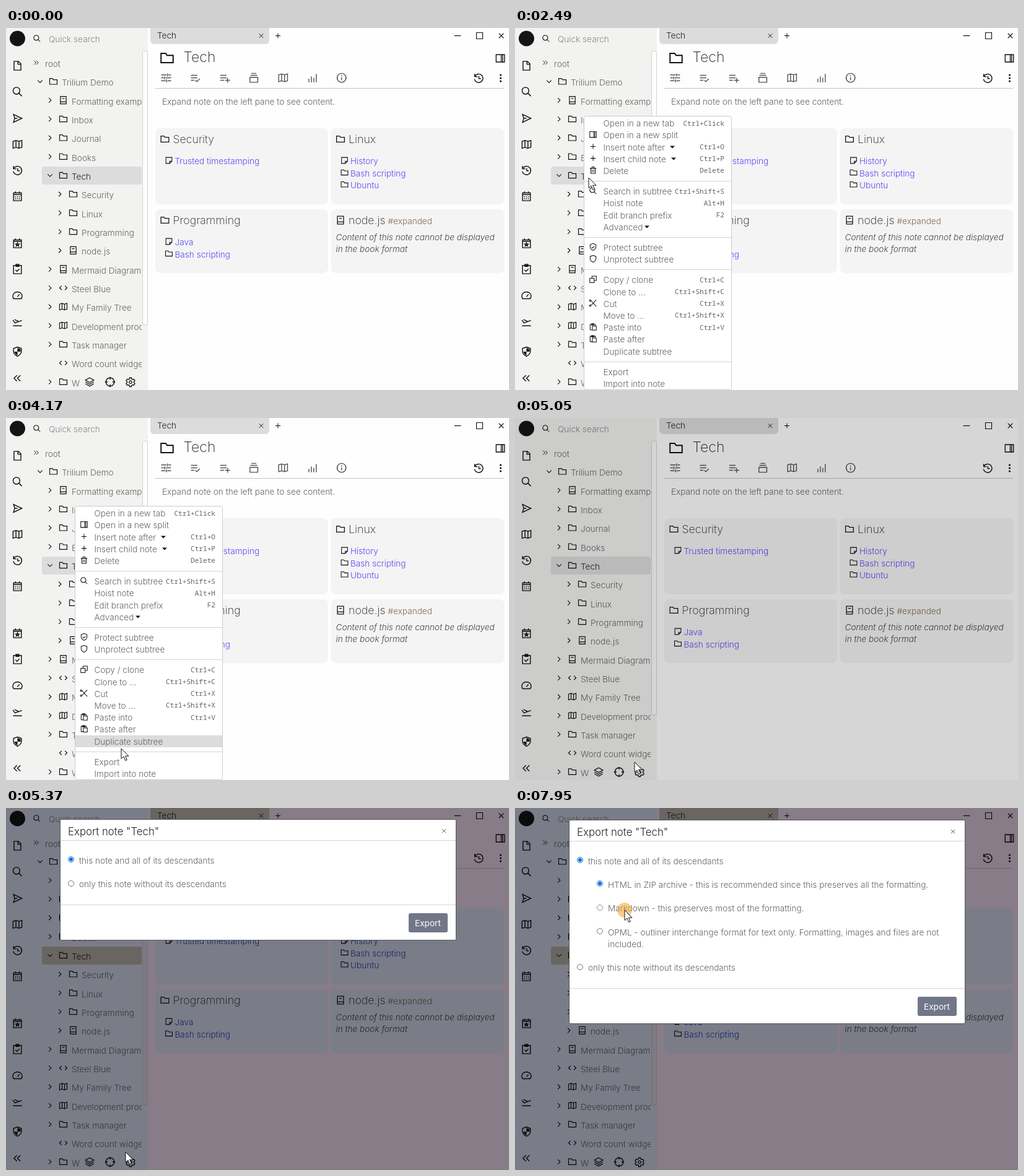
An HTML page that plays this animation: 812 px wide and 585 px high, repeating every 8000 ms.

```html
<!DOCTYPE html>
<html lang="en">
<head>
<meta charset="utf-8">
<title>Exporting a note</title>
<style>
  html, body { margin: 0; width: 100%; height: 100%; overflow: hidden; }
  svg {
    display: block; width: 812px; height: 585px;
    font: 300 13.6px Inter, sans-serif; fill: #646464;
    --main: #fefefe; --panel: #f2f2f1; --card: #f4f4f4; --picked: #dbdcdb;
    --bar: #fdfdfd; --link: #5a48fa;
  }
  svg.dim { --main: #ffeaff; --panel: #e6ecff; --card: #e6ecff; --picked: #c6bfb6; --bar: #eee4f4; --link: #2a40c4; }
  text { white-space: pre; }
  .icon { fill: none; stroke: #111; stroke-width: 1.8; }
  .tool .icon { stroke: #555; }
  .link { fill: var(--link); }
  .dark { fill: #222; }
  .title { fill: #222; font-size: 17.8px; font-weight: 200; }
  .mono { font: 11.1px "Noto Sans Mono", monospace; text-anchor: end; }
  .line { stroke: #d4d4d4; }
</style>
</head>
<body>
<svg id="stage" viewBox="0 0 812 585"></svg>
<script>
const stage = document.getElementById('stage');

// Outlines on a 24 unit grid.
const ICONS = {
  folder: 'M3 5h7l2 3h9v11H3z',
  book: 'M5 3h14v18H5zM5 16h14M9 8h6',
  note: 'M4 4h16v10l-6 6H4zM20 14h-6v6',
  file: 'M5 3h9l5 5v13H5zM13 3v6h6',
  search: 'M10 3a7 7 0 1 0 .01 0zM15 15l6 6',
  send: 'M4 4l17 8-17 8 2.5-8zM6 12h6',
  map: 'M3 6l6-2 6 2 6-2v14l-6 2-6-2-6 2zM9 4v14M15 6v14',
  history: 'M4.5 8a8.7 8.7 0 1 1-1 6M4 3v6h6M12.5 8v5h4',
  calendar: 'M4 5h16v16H4zM4 8.5h16M8 2v4M16 2v4M7 13h2m2 0h2m2 0h2M7 17h2m2 0h2m2 0h2',
  event: 'M4 5h16v16H4zM4 8h16M8 2v4M16 2v4M12 11l1 2.5h2.5l-2 1.5.8 2.5-2.3-1.5-2.3 1.5.8-2.5-2-1.5h2.5z',
  task: 'M4 4h16v17H4zM9 2v4h6v-4zM8 13l3 3 5-5',
  gauge: 'M4.5 19a9.5 8.7 0 1 1 15 0zM12 15l4-5',
  plane: 'M3 20h18M2.5 8l4.5 6 14-5M6 7l8 4',
  shield: 'M12 2.5l8 3v6c0 5-4 8-8 10-4-2-8-5-8-10v-6z',
  check: 'M8 12l3 3 5-5',
  left2: 'M11 6l-6 6 6 6M18 6l-6 6 6 6',
  right2: 'M6 6l6 6-6 6M13 6l6 6-6 6',
  right: 'M9 6l6 6-6 6',
  down: 'M6 9l6 6 6-6',
  code: 'M8 7l-5 5 5 5M16 7l5 5-5 5',
  layers: 'M12 3l9 5-9 5-9-5zM3 12l9 5 9-5M3 16l9 5 9-5',
  target: 'M12 3a9 9 0 1 0 .01 0zM12 1v6M12 17v6M1 12h6M17 12h6',
  cog: 'M10 3h4l.6 2.6 2.2 1.2 2.6-.8 2 3.5-2 1.9v2.2l2 1.9-2 3.5-2.6-.8-2.2 1.2L14 22h-4l-.6-2.6-2.2-1.2-2.6.8-2-3.5 2-1.9v-2.2l-2-1.9 2-3.5 2.6.8 2.2-1.2zM12 9.5a3 3 0 1 0 .01 0z',
  sliders: 'M2 6h11M17 6h5M15 3v6M2 12h5M11 12h11M9 9v6M2 18h9M15 18h7M13 15v6',
  listCheck: 'M3 7h13M3 12h13M3 17h7M12 17l3 3 6-6',
  listPlus: 'M3 7h13M3 12h13M3 17h8M18 12v10M13 17h10',
  stack: 'M4 11h16v10H4zM5 7h14M7 3h10',
  chart: 'M5 14v7M10 9v12M15 12v9M20 4v17',
  info: 'M12 3a9 9 0 1 0 .01 0zM12 11v6M12 7v2',
  split: 'M3 4h18v16H3zM14 4v16M17 4v16',
  plus: 'M12 5v14M5 12h14',
  close: 'M6 6l12 12M18 6L6 18',
  minus: 'M4 12h16',
  square: 'M4 4h16v16H4z',
  trash: 'M6 7h12v14H6zM3 7h18M9 7V3h6v4M10 11v6M14 11v6',
  copy: 'M3 9h12v12H3zM9 9V3h12v12h-6',
  cut: 'M5 4l12 13M5 20L17 7M4 3a2 2 0 1 0 .01 0zM4 17a2 2 0 1 0 .01 0zM17 17l4 4M17 7l4-4',
  paste: 'M9 20H4V5h14v4M8 3h6v4H8zM10 10h11v11H10z'
};

const text = (x, y, content, attrs = '') =>
  `<text x="${x}" y="${y + 5.2}" ${attrs}>${content}</text>`;
const icon = (name, x, y, size = 16, attrs = '') =>
  `<path class="icon" d="${ICONS[name]}" transform="translate(${x - size / 2} ${y - size / 2}) scale(${size / 24})" ${attrs}/>`;
const rect = (x, y, w, h, fill, r = 0, attrs = '') =>
  `<rect x="${x}" y="${y}" width="${w}" height="${h}" rx="${r}" style="fill:${fill}" ${attrs}/>`;
const line = (x1, x2, y) => `<path class="line" d="M${x1} ${y}H${x2}"/>`;

function launcher() {
  const items = [['file', 61], ['search', 103], ['send', 146], ['map', 188], ['history', 230], ['calendar', 272],
    ['event', 348], ['task', 390], ['gauge', 432], ['plane', 475], ['shield', 523], ['left2', 566]];
  return items.map(([name, y]) => icon(name, 18.5, y, 19)).join('') +
    '<path d="M18.5 517l5 2v4h-5zM18.5 523v6q-4-2-5-6z" fill="#111"/>';
}

function tree() {
  const rows = [
    [0, 'down', 'folder', 'Trilium Demo'], [1, 'right', 'book', 'Formatting examples'],
    [1, 'right', 'folder', 'Inbox'], [1, 'right', 'folder', 'Journal'], [1, 'right', 'folder', 'Books'],
    [1, 'down', 'folder', 'Tech'], [2, 'right', 'folder', 'Security'], [2, 'right', 'folder', 'Linux'],
    [2, 'right', 'folder', 'Programming'], [2, 'right', 'book', 'node.js'],
    [1, 'right', 'book', 'Mermaid Diagrams'], [1, 'right', 'code', 'Steel Blue'],
    [1, 'right', 'map', 'My Family Tree'], [1, 'right', 'map', 'Development process'],
    [1, 'right', 'folder', 'Task manager'], [1, '', 'code', 'Word count widget'],
    [1, 'right', 'folder', 'Workspaces']
  ];
  const body = rows.map(([level, arrow, kind, label], i) => {
    const x = 16 * level, y = 57.7 + 30.33 * (i + 1);
    return (arrow ? icon(arrow, 55 + x, y - 1.5, 15) : '') + icon(kind, 76.5 + x, y - 1.7, 16) +
      text(90 + x, y, label, label === 'Tech' ? 'class="dark"' : '');
  }).join('');
  return rect(58, 224, 161, 29, 'var(--picked)', 3) +
    `<clipPath id="treeClip"><path d="M40 0H219V560H119V585H40z"/></clipPath><g clip-path="url(#treeClip)">${body}</g>` +
    icon('right2', 48.5, 56, 13) + text(63, 57.5, 'root') +
    rect(220.5, 37.5, 8, 442, 'var(--bar)', 2, 'stroke="#d2d2d2"') +
    icon('layers', 135, 572, 18) + icon('target', 168, 572, 18) + icon('cog', 201, 572, 18);
}

function card(x, y, h, kind, title, links) {
  return rect(x, y, x < 300 ? 279 : 280, h, 'var(--card)', 8) +
    icon(kind, x + 15.5, y + 17.5, 17) + text(x + 28.5, y + 19, title, 'class="title"') +
    links.map(([type, label], i) => icon(type, x + 22, y + 52 + i * 19.4, 14.5) +
      text(x + 31.5, y + 53 + i * 19.4, label, 'class="link"')).join('');
}

function notePane() {
  const tools = ['sliders', 'listCheck', 'listPlus', 'stack', 'map', 'chart', 'info'];
  return rect(233, -8, 192, 34, 'var(--picked)', 6) + text(244, 12, 'Tech', 'class="dark"') +
    icon('close', 412, 12.5, 13) + icon('plus', 439, 12.5, 14) +
    icon('minus', 729, 12.5, 16) + icon('square', 764.5, 12.5, 15) + icon('close', 799.5, 12.5, 15) +
    icon('folder', 260, 48.5, 26) + text(286.5, 50, 'Tech', 'class="title" style="font-size:23px"') +
    icon('split', 798, 49, 18) +
    `<g class="tool">${tools.map((name, i) => icon(name, 258.5 + i * 47.2, 80.5, 19)).join('')}</g>` +
    icon('history', 763, 81, 19) +
    [76, 81, 86].map(y => `<circle cx="798.5" cy="${y}" r="1.6" fill="#111"/>`).join('') +
    '<path d="M241 97.5H804" stroke="#c4c4c4"/>' +
    text(252, 119, 'Expand note on the left pane to see content.') +
    card(241, 162, 123, 'folder', 'Security', [['note', 'Trusted timestamping']]) +
    card(524.5, 162, 123, 'folder', 'Linux', [['note', 'History'], ['folder', 'Bash scripting'], ['folder', 'Ubuntu']]) +
    card(241, 293, 103, 'folder', 'Programming', [['note', 'Java'], ['folder', 'Bash scripting']]) +
    card(524.5, 293, 103, 'book', 'node.js', []) +
    text(616.5, 312, '#expanded', 'fill="#7d6a58"') +
    ['Content of this note cannot be displayed', 'in the book format'].map((s, i) =>
      text(532.5, 338 + 19 * i, s, 'fill="#444" font-style="italic"')).join('');
}

const ROW = 19.2;
const menuRows = [];
function menu() {
  const groups = [
    [['', 'Open in a new tab', 'Ctrl+Click'], ['split', 'Open in a new split'],
      ['plus', 'Insert note after', 'Ctrl+O', 254], ['plus', 'Insert child note', 'Ctrl+P', 256], ['trash', 'Delete', 'Delete']],
    [['search', 'Search in subtree', 'Ctrl+Shift+S'], ['', 'Hoist note', 'Alt+H'],
      ['', 'Edit branch prefix', 'F2'], ['', 'Advanced', '', 213]],
    [['shield', 'Protect subtree'], ['shield', 'Unprotect subtree']],
    [['copy', 'Copy / clone', 'Ctrl+C'], ['', 'Clone to ...', 'Ctrl+Shift+C'], ['cut', 'Cut', 'Ctrl+X'],
      ['', 'Move to ...', 'Ctrl+Shift+X'], ['paste', 'Paste into', 'Ctrl+V'], ['paste', 'Paste after'], ['', 'Duplicate subtree']],
    [['', 'Export'], ['', 'Import into note']]
  ];
  let y = 154, body = '';
  groups.forEach((group, g) => {
    if (g) body += line(112, 349, Math.round(y - 17) + .5);
    for (const [kind, label, keys = '', caret] of group) {
      menuRows.push(y);
      if (kind) body += icon(kind, 126, y - 1, 14);
      if (label === 'Protect subtree') body += icon('check', 126, y - 1, 14);
      body += text(142.5, y, label) + text(338, y - 1.7, keys, 'class="mono"');
      if (caret) body += `<path d="M${caret - 4} ${y - 2}h8l-4 4z" fill="#111"/>`;
      y += ROW;
    }
    y += 14;
  });
  return `<g id="menu">${rect(111.5, 142.5, 238, 442, '#fff', 3, 'stroke="#ccc"')}
    <rect id="hover" x="112" width="237" height="${ROW}" fill="#dcdcdc"/>${body}</g>`;
}

const radio = (x, y, on) => on
  ? `<circle cx="${x}" cy="${y}" r="4.5" fill="#fff" stroke="#0b6fd6"/><circle cx="${x}" cy="${y}" r="3" fill="#0b6fd6"/>`
  : `<circle class="radio" cx="${x}" cy="${y}" r="4.5" fill="#fff" stroke="#767676"/>`;

function dialog() {
  return `<g id="dialog">${rect(87.5, 19.5, 639, 329, '#fff', 2, 'id="sheet" stroke="#555"')}
    ${text(100, 40, 'Export note "Tech"', 'class="dark" font-size="16.8"')}
    ${icon('close', 707, 38, 13, 'style="stroke:#666"')}${line(88, 726, 53.5)}
    ${radio(105, 84, true)}${text(118, 86, 'this note and all of its descendants')}
    <g id="formats">
      ${radio(137, 122, true)}${text(150, 124, 'HTML in ZIP archive - this is recommended since this preserves all the formatting.')}
      ${radio(137, 161)}${text(150, 162, 'Markdown - this preserves most of the formatting.')}
      ${radio(137, 199)}${text(150, 201, 'OPML - outliner interchange format for text only. Formatting, images and files are not')}
      ${text(150, 220, 'included.')}
    </g>
    <g id="lower">
      ${radio(105, 257)}${text(118, 258, 'only this note without its descendants')}
      ${line(88, 726, 291.5)}${rect(650, 305, 63, 31, '#727689', 3)}
      ${text(660, 320.5, 'Export', 'style="fill:#fff;font-weight:400"')}
    </g></g>`;
}

stage.innerHTML = rect(0, 0, 812, 585, 'var(--main)') + rect(0, 0, 229, 585, 'var(--panel)') +
  '<circle cx="18.5" cy="17" r="12.5" fill="#141414"/>' +
  icon('search', 50, 17, 14) + text(69, 18, 'Quick search', 'fill="#888"') +
  launcher() + tree() + notePane() +
  '<rect id="shade" width="812" height="585" fill="#000"/>' + menu() + dialog() +
  `<g id="cursor"><circle id="press" r="12" fill="#f2a52e" fill-opacity=".55"/>
   <path d="M0 0V16.5L4 13L6.7 19.5 9.3 18.4 6.6 12.2H12Z" fill="#fff" stroke="#111"/></g>`;

const part = Object.fromEntries(['shade', 'menu', 'hover', 'dialog', 'sheet', 'formats', 'lower', 'cursor', 'press']
  .map(id => [id, document.getElementById(id)]));
const radios = [...stage.querySelectorAll('.radio')];

// Pointer path: time, x, y.
const PATH = [
  [130, 800, 300], [200, 640, 350], [270, 460, 383], [340, 270, 387], [410, 125, 366], [470, 73, 345],
  [1260, 73, 345], [1400, 57, 312], [1530, 53, 275], [1640, 72, 245], [1740, 100, 236], [1810, 113, 252],
  [2040, 113, 252], [2150, 119, 242], [3330, 119, 242], [3430, 123, 262], [3700, 150, 390], [3950, 180, 495],
  [4100, 186, 523], [4170, 186, 534], [4310, 187, 543], [4470, 187, 543], [4580, 193, 556],
  [6180, 193, 556], [6300, 199, 525], [6500, 210, 420], [6700, 203, 290], [6850, 190, 210],
  [6950, 183, 183], [7020, 181, 178], [7150, 177, 165], [8000, 177, 165]
];

const clamp = v => Math.max(0, Math.min(1, v));
const between = (t, a, b) => t >= a && t < b;
const show = (el, on) => el.setAttribute('display', on ? 'inline' : 'none');

function pointerAt(t) {
  const i = Math.max(1, PATH.findIndex(p => p[0] > t));
  const [t0, x0, y0] = PATH[i - 1], [t1, x1, y1] = PATH[i];
  const k = clamp((t - t0) / (t1 - t0));
  return [x0 + (x1 - x0) * k, y0 + (y1 - y0) * k];
}

function draw(t) {
  const [x, y] = pointerAt(t);
  show(part.cursor, t >= 130);
  part.cursor.setAttribute('transform', `translate(${x} ${y})`);
  show(part.press, between(t, 2370, 2490) || between(t, 4980, 5050) || t >= 7950);

  // The highlighted row trails the pointer a little.
  const menuOpen = between(t, 2490, 5003);
  const hoverY = pointerAt(t - 60)[1];
  const row = menuRows.find(r => Math.abs(hoverY - r) < ROW / 2);
  show(part.menu, menuOpen);
  show(part.hover, menuOpen && row !== undefined);
  if (row !== undefined) part.hover.setAttribute('y', row - ROW / 2);

  stage.classList.toggle('dim', t >= 5100);
  part.shade.setAttribute('opacity', .47 * clamp((t - 5001) / 150));

  const expanded = t >= 5440;
  const drop = -50 * (1 - clamp((t - 5100) / 300)) ** 1.7;
  show(part.dialog, t >= 5110);
  part.dialog.setAttribute('opacity', clamp((t - 5115) / 155));
  part.dialog.setAttribute('transform', `translate(0 ${drop})`);
  part.sheet.setAttribute('height', expanded ? 329 : 195);
  part.lower.setAttribute('transform', `translate(0 ${expanded ? 0 : -134})`);
  show(part.formats, expanded);
  for (const el of radios) {
    const over = Math.abs(y - 2 - el.getAttribute('cy')) < 10;
    el.setAttribute('stroke', !over ? '#767676' : t >= 7950 ? '#8d8d8d' : '#4f4f4f');
  }
}

const start = performance.now();
function tick(now) {
  draw(Math.max(0, now - start) % 8000);
  requestAnimationFrame(tick);
}
draw(0);
requestAnimationFrame(tick);
</script>
</body>
</html>
```
